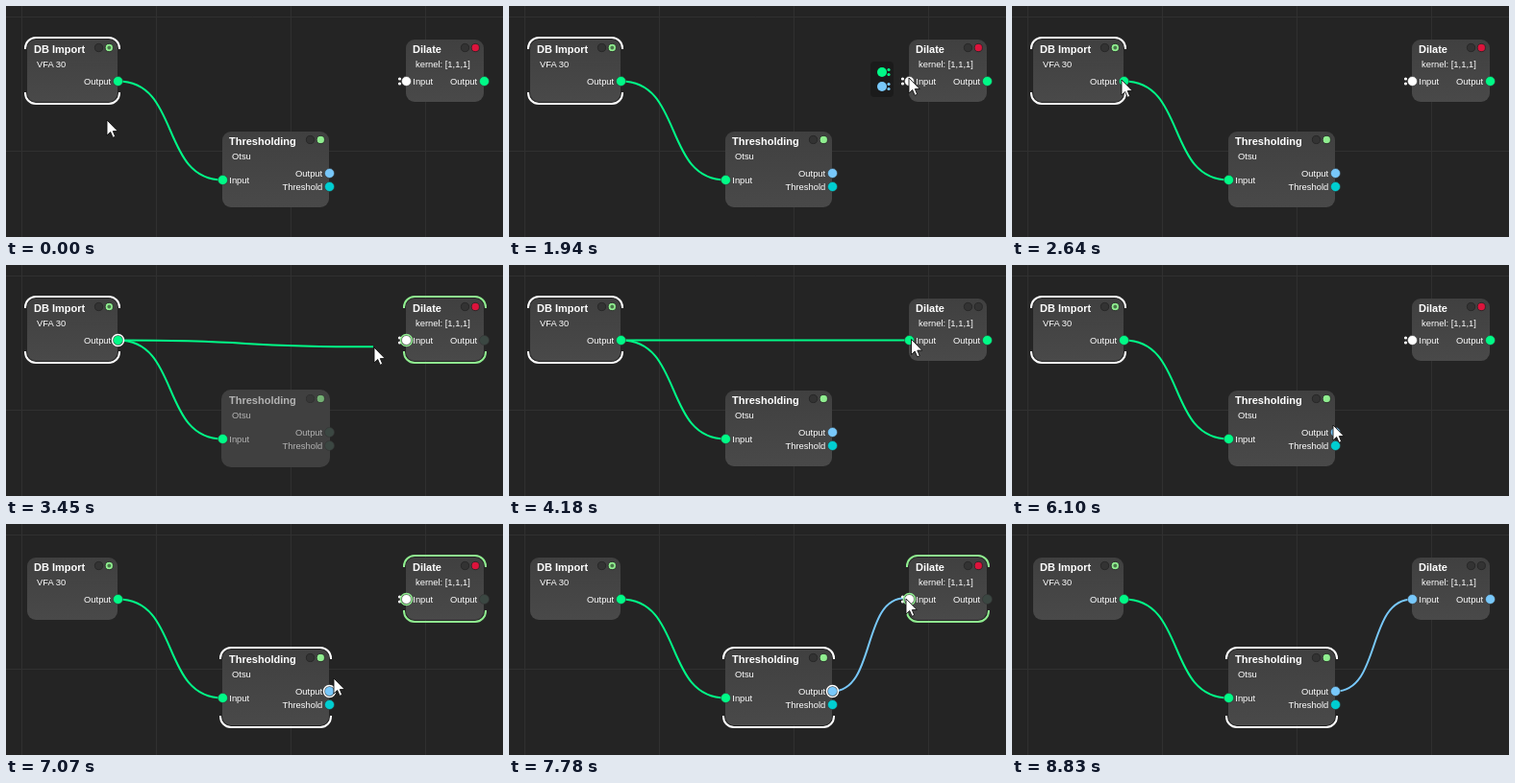
An HTML page for the animation above (9.41 s loop, 517 by 241 pixels).

```html
<!DOCTYPE html>
<html lang="en">
<head>
<meta charset="utf-8">
<title>Node editor</title>
<style>
  html, body { margin: 0; width: 100%; height: 100%; overflow: hidden; background: #242424; }
  svg { display: block; width: 517px; height: 241px; }
  text { font: 9.4px "Liberation Sans", Arial, sans-serif; fill: #fff; }
  .title { font-size: 11px; font-weight: bold; }
  .end { text-anchor: end; }
  .grid { stroke: #303030; }
  .wire, .halo, .bracket, .ring { fill: none; }
  .wire { stroke-width: 2; }
  .halo { stroke-width: 8; opacity: .45; }
  .bracket { stroke-width: 2; }
  .ring { stroke-width: 1.5; }
  .port { stroke: #333; stroke-width: .6; }
  .lamp { stroke: #222; stroke-width: .8; }
  .dim text { opacity: .6; }
  .dim .body { fill: #404040; stroke: #404040; stroke-width: 2; }
  .dim .lamp { opacity: .65; }
</style>
</head>
<body>
<svg id="stage" viewBox="0 0 517 241">
  <defs>
    <linearGradient id="shade" x2="0" y2="1">
      <stop stop-color="#404040"/><stop offset="1" stop-color="#494949"/>
    </linearGradient>
  </defs>
</svg>
<script>
const LOOP = 9410;
const GREEN = '#00fa87', BLUE = '#78c8fa', CYAN = '#00ced1', LIGHT = '#90ee90',
      RED = '#dc143c', DARK = '#333', OFF = '#3b4742', WHITE = '#fff';

const stage = document.getElementById('stage');

function add(parent, tag, attrs, text) {
  const el = document.createElementNS('http://www.w3.org/2000/svg', tag);
  for (const key in attrs) el.setAttribute(key, attrs[key]);
  if (text) el.textContent = text;
  parent.append(el);
  return el;
}
const group = (parent = stage) => add(parent, 'g', {});
const dot = (parent, cx, cy, r, fill, cls = '') =>
  add(parent, 'circle', { cx, cy, r, fill, class: cls });
const label = (parent, x, y, text, cls = '') =>
  add(parent, 'text', { x, y, class: cls }, text);
const show = (el, on) => el.setAttribute('visibility', on ? 'visible' : 'hidden');
const paint = (el, color) => el.setAttribute('fill', color);

for (const x of [16.5, 156.5, 296.5, 436.5]) add(stage, 'path', { d: `M${x} 0V241`, class: 'grid' });
for (const y of [11.5, 151.5]) add(stage, 'path', { d: `M0 ${y}H517`, class: 'grid' });

function makeNode(x, y, w, h, title, detail, detailX) {
  const g = group();
  add(g, 'rect', { x, y, width: w, height: h, rx: 9, fill: 'url(#shade)', class: 'body' });
  const l = x - 2, t = y - 2, r = x + w + 2, b = y + h + 2;
  const bracket = add(g, 'path', {
    class: 'bracket',
    d: `M${l} ${t + 12}v-1a11 11 0 0 1 11-11H${r - 11}a11 11 0 0 1 11 11v1` +
       `M${l} ${b - 12}v1a11 11 0 0 0 11 11H${r - 11}a11 11 0 0 0 11-11v-1`
  });
  label(g, x + 7, y + 14, title, 'title');
  label(g, detailX, y + 29, detail);
  dot(g, x + w - 19.5, y + 8.5, 4.1, DARK, 'lamp');
  const lamp = dot(g, x + w - 8.7, y + 8.5, 4.1, LIGHT, 'lamp');
  return { g, bracket, lamp };
}

function makePort(node, x, y, color, name, isInput) {
  label(node.g, isInput ? x + 6.8 : x - 7.3, y + 3.4, name, isInput ? '' : 'end');
  return { x, y, color, layer: group() };
}
function drawPort(port) {
  port.disc = dot(port.layer, port.x, port.y, 5, port.color, 'port');
  port.ring = add(port.layer, 'circle', { cx: port.x, cy: port.y, r: 6, stroke: WHITE, class: 'ring' });
  show(port.ring, false);
  stage.append(port.layer);
}

const importer = makeNode(22, 35, 94, 65, 'DB Import', 'VFA 30', 32);
const threshold = makeNode(225, 131, 111, 79, 'Thresholding', 'Otsu', 235);
const dilate = makeNode(416, 35, 81, 65, 'Dilate', 'kernel: [1,1,1]', 426);
dot(importer.g, 107.3, 43.5, 1.9, '#4a754a');

const importOut = makePort(importer, 116.5, 78.5, GREEN, 'Output');
const thresholdIn = makePort(threshold, 225.5, 181.5, GREEN, 'Input', true);
const thresholdOut = makePort(threshold, 336.5, 174.5, BLUE, 'Output');
const levelOut = makePort(threshold, 336.5, 188.5, CYAN, 'Threshold');
const dilateIn = makePort(dilate, 416.5, 78.5, WHITE, 'Input', true);
const dilateOut = makePort(dilate, 497.5, 78.5, GREEN, 'Output');

const curve = (a, b) => {
  const reach = (b.x - a.x) * .6;
  return `M${a.x} ${a.y}C${a.x + reach} ${a.y} ${b.x - reach} ${b.y} ${b.x} ${b.y}`;
};
add(stage, 'path', { d: curve(importOut, thresholdIn), stroke: GREEN, class: 'wire' });
const halo = add(stage, 'path', { class: 'halo' });
const wire = add(stage, 'path', { class: 'wire' });

const pair = group();
for (const y of [76, 81]) dot(pair, 409.5, y, 1.6, WHITE);
[importOut, thresholdIn, thresholdOut, levelOut, dilateIn, dilateOut].forEach(drawPort);

const hint = group();
add(hint, 'rect', { x: 376, y: 58, width: 24, height: 37, rx: 4, fill: '#1b1b1b' });
[[69, GREEN], [84, BLUE]].forEach(([y, color]) => {
  dot(hint, 388, y, 5, color);
  for (const dy of [-2.5, 2.5]) dot(hint, 395, y + dy, 1.6, color);
});

const cursor = add(stage, 'path', {
  d: 'M0 0V16L3.7 12.5 6.2 18.3 8.7 17.2 6.3 11.6H11.3Z',
  fill: WHITE, stroke: '#111', 'stroke-width': .9
});

// Pointer moves: first step time, step count, last step time, goal x, goal y
const moves = [
  [120, 2, 240, 455, 85], [490, 4, 850, 415, 74], [970, 1, 970, 415, 75],
  [1940, 1, 1940, 416, 75], [2060, 6, 2640, 114, 77],
  [2990, 2, 3100, 122, 79], [3220, 3, 3450, 383, 86], [3570, 4, 3930, 414, 78],
  [4050, 4, 4420, 423, 77], [4670, 2, 4790, 483, 77],
  [5020, 1, 5020, 468, 77], [5140, 2, 5250, 400, 76],
  [5620, 5, 6100, 334, 167], [6220, 3, 6460, 335, 167], [6580, 1, 6580, 335, 168],
  [6950, 2, 7070, 341, 161], [7190, 6, 7780, 413, 78],
  [8110, 1, 8110, 415, 76], [8470, 3, 8710, 405, 86]
];

function pointerAt(t) {
  let x = 105, y = 119;
  for (const [from, count, to, goalX, goalY] of moves) {
    if (t < from) break;
    const gap = count > 1 ? (to - from) / (count - 1) : 1;
    const p = Math.min(1, (Math.floor((t - from) / gap + .01) + 1) / count);
    const eased = p * p * (3 - 2 * p);
    x += (goalX - x) * eased;
    y += (goalY - y) * eased;
    if (p < 1) break;
  }
  return { x, y };
}

function render(t) {
  const within = (from, to) => t >= from && t < to;
  const tip = pointerAt(t);
  const dragGreen = within(2990, 4180), dragBlue = within(6950, 8110);
  const dragging = dragGreen || dragBlue;
  const linkGreen = within(4180, 5620), linkBlue = t >= 8110;
  const linked = linkGreen || linkBlue;
  const blueSide = t >= 6950;
  const source = blueSide ? thresholdOut : importOut;
  const pulled = dragging && Math.hypot(tip.x - source.x, tip.y - source.y) > 16;

  cursor.setAttribute('transform', `translate(${tip.x} ${tip.y})`);
  show(cursor, t < 8830);
  show(hint, within(850, 2060));

  const end = linked ? dilateIn : { x: tip.x - 1, y: tip.y - .7 };
  for (const line of [wire, halo]) {
    line.setAttribute('d', curve(source, end));
    line.setAttribute('stroke', source.color);
  }
  show(wire, pulled || linked);
  show(halo, within(5250, 5620) || within(8470, 8830));

  importer.bracket.setAttribute('stroke', blueSide ? 'none' : WHITE);
  threshold.bracket.setAttribute('stroke', blueSide ? WHITE : 'none');
  dilate.bracket.setAttribute('stroke', dragging ? LIGHT : 'none');
  threshold.g.setAttribute('class', dragGreen ? 'dim' : '');

  show(importOut.ring, dragGreen);
  show(thresholdOut.ring, dragBlue);
  show(dilateIn.ring, dragging);
  dilateIn.ring.setAttribute('stroke', LIGHT);
  show(pair, !linked);

  paint(dilate.lamp, linked ? DARK : RED);
  paint(dilateIn.disc, linked ? source.color : WHITE);
  paint(dilateOut.disc, dragging ? OFF : linkBlue ? BLUE : GREEN);
  paint(thresholdOut.disc, dragGreen ? OFF : BLUE);
  paint(levelOut.disc, dragGreen ? OFF : CYAN);
}

const start = performance.now();
function tick() {
  render((performance.now() - start) % LOOP);
  requestAnimationFrame(tick);
}
tick();
</script>
</body>
</html>
```
